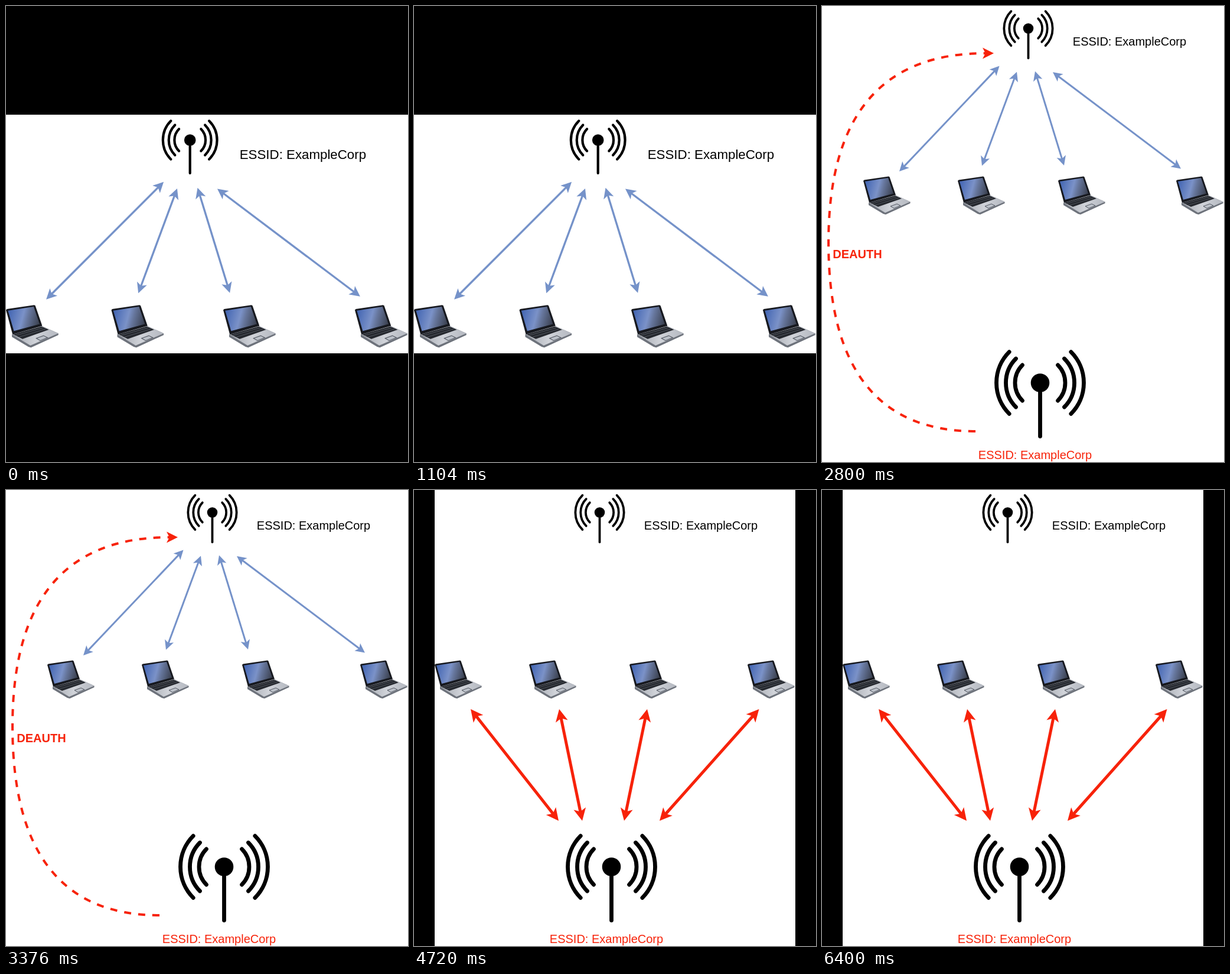
An HTML page for the animation above (7520 ms loop, 681 by 772 pixels).

```html
<!DOCTYPE html>
<html lang="en">
<head>
<meta charset="utf-8">
<title>Evil twin access point</title>
<style>
  html, body { margin: 0; width: 100%; height: 100%; overflow: hidden; background: #000; }
  svg { display: block; width: 681px; height: 772px; }
  text { font: 20px "Liberation Sans", Arial, sans-serif; text-anchor: middle; }
  .bold { font-weight: bold; }
</style>
</head>
<body>
<svg viewBox="0 0 681 772">
  <defs>
    <linearGradient id="glass" x1="0" y1=".4" x2="1" y2=".6">
      <stop offset="0" stop-color="#4668b4"/>
      <stop offset=".45" stop-color="#7b92c8"/>
      <stop offset=".62" stop-color="#66769c"/>
      <stop offset="1" stop-color="#3b4150"/>
    </linearGradient>
    <linearGradient id="metal">
      <stop offset="0" stop-color="#a4a8b0"/>
      <stop offset=".5" stop-color="#d0d3d9"/>
      <stop offset="1" stop-color="#b4b8c0"/>
    </linearGradient>
    <g id="laptop">
      <path d="M9 45 54 32 79.500 43.500V46L38 65 34 64 9 49Z" fill="#6d727b"/>
      <path d="M9 45 54 32 79.500 43.500 37 62Z" fill="url(#metal)"/>
      <path d="M11 45 54 33 65 38 25 52Z" fill="#25282e"/>
      <path d="M15 46.500 56 35M20 49 60 37" stroke="#565b64" stroke-width=".8"/>
      <path d="M46 51 57 47 63 50 52 54.500Z" fill="#bcc1c9" stroke="#555a64" stroke-width="1"/>
      <path d="M0 8 1.500 6.500 43 .5 44.500 1.500 55 32 10 45Z" fill="#17191f"/>
      <path d="M3 9 42 3 51 29.500 12 40Z" fill="url(#glass)"/>
    </g>
    <g id="antenna" fill="none" stroke="#000" stroke-width="6.800" stroke-linecap="round">
      <circle r="15.800" fill="#000" stroke="none"/>
      <path d="M0 0V90.500"/>
      <g id="waves"></g>
    </g>
  </defs>
  <rect id="paper" fill="#fff"/>
  <g id="scene"></g>
</svg>
<script>
const BLUE = '#7592c9', RED = '#f72209';
const el = id => document.getElementById(id);

// Notched arrowhead with its tip at (x, y), pointing along angle.
const head = (x, y, angle, size, color) =>
  `<path d="M0 0 ${-size} ${-size / 2} ${-size * .75} 0 ${-size} ${size / 2}Z" fill="${color}"
    transform="translate(${x} ${y}) rotate(${angle * 180 / Math.PI})"/>`;

function link([x1, y1, x2, y2], color, width, size) {
  const angle = Math.atan2(y2 - y1, x2 - x1);
  const dx = Math.cos(angle) * size * .7, dy = Math.sin(angle) * size * .7;
  return `<path d="M${x1 + dx} ${y1 + dy}L${x2 - dx} ${y2 - dy}" stroke="${color}" stroke-width="${width}"/>`
    + head(x1, y1, angle + Math.PI, size, color) + head(x2, y2, angle, size, color);
}

const label = (x, y, text, color, cls = '') =>
  `<text x="${x}" y="${y}" fill="${color}" class="${cls}">${text}</text>`;

const antenna = (x, y, scale) =>
  `<use href="#antenna" transform="translate(${x} ${y}) scale(${scale})"/>`;

el('waves').innerHTML = [42.5, 58, 74].map(r => {
  const c = r * Math.SQRT1_2;
  return [-1, 1].map(side =>
    `<path d="M${side * c} ${-c}A${r} ${r} 0 0 ${side > 0 ? 1 : 0} ${side * c} ${c}"/>`).join('');
}).join('');

const base = antenna(349.5, 38, .556)
  + label(521, 67, 'ESSID: ExampleCorp', '#000')
  + [70, 230, 400, 600].map(x => `<use href="#laptop" x="${x}" y="288"/>`).join('');

const rogue = antenna(369.5, 638, 1) + label(361, 767, 'ESSID: ExampleCorp', RED);

const deauth = `<path d="M260 720Q11 720 11 400 11 80 277 80" fill="none" stroke="${RED}"
    stroke-width="4" stroke-dasharray="12"/>`
  + head(291, 80, 0, 19, RED) + label(60, 427, 'DEAUTH', RED, 'bold');

const blueLinks = firstX => [
  [firstX, 101.5, 131, 280], [330, 111.5, 271, 270.5],
  [361, 110.5, 410, 270], [391, 112, 608, 275.5]
].map(p => link(p, BLUE, 3, 16)).join('');

const redLinks = [
  [131, 371, 280, 560], [281, 371, 320, 560],
  [430, 371, 391, 560], [619.5, 371, 451, 560]
].map(p => link(p, RED, 5, 21)).join('');

const full = [0, 0, 681, 772], narrow = [35, 0, 611, 772];
const shifted = 'translate(-35 0)';
const stages = [
  { until: 1840, paper: [0, 184, 681, 404], view: 'translate(-78 184.600) scale(1.115)', art: base + blueLinks(309.5) },
  { until: 2800, paper: narrow, view: shifted, art: base + rogue + blueLinks(300.5) },
  { until: 3760, paper: full, view: '', art: base + rogue + deauth + blueLinks(300.5) },
  { until: 4720, paper: full, view: '', art: base + rogue + deauth + redLinks },
  { until: 7520, paper: narrow, view: shifted, art: base + rogue + redLinks }
];

let shown;
function draw(now) {
  const time = now % 7520;
  const stage = stages.find(s => time < s.until);
  if (stage !== shown) {
    shown = stage;
    ['x', 'y', 'width', 'height'].forEach((name, i) => el('paper').setAttribute(name, stage.paper[i]));
    el('scene').setAttribute('transform', stage.view);
    el('scene').innerHTML = stage.art;
  }
}

const start = performance.now();
function tick() {
  draw(performance.now() - start);
  requestAnimationFrame(tick);
}
tick();
</script>
</body>
</html>
```
